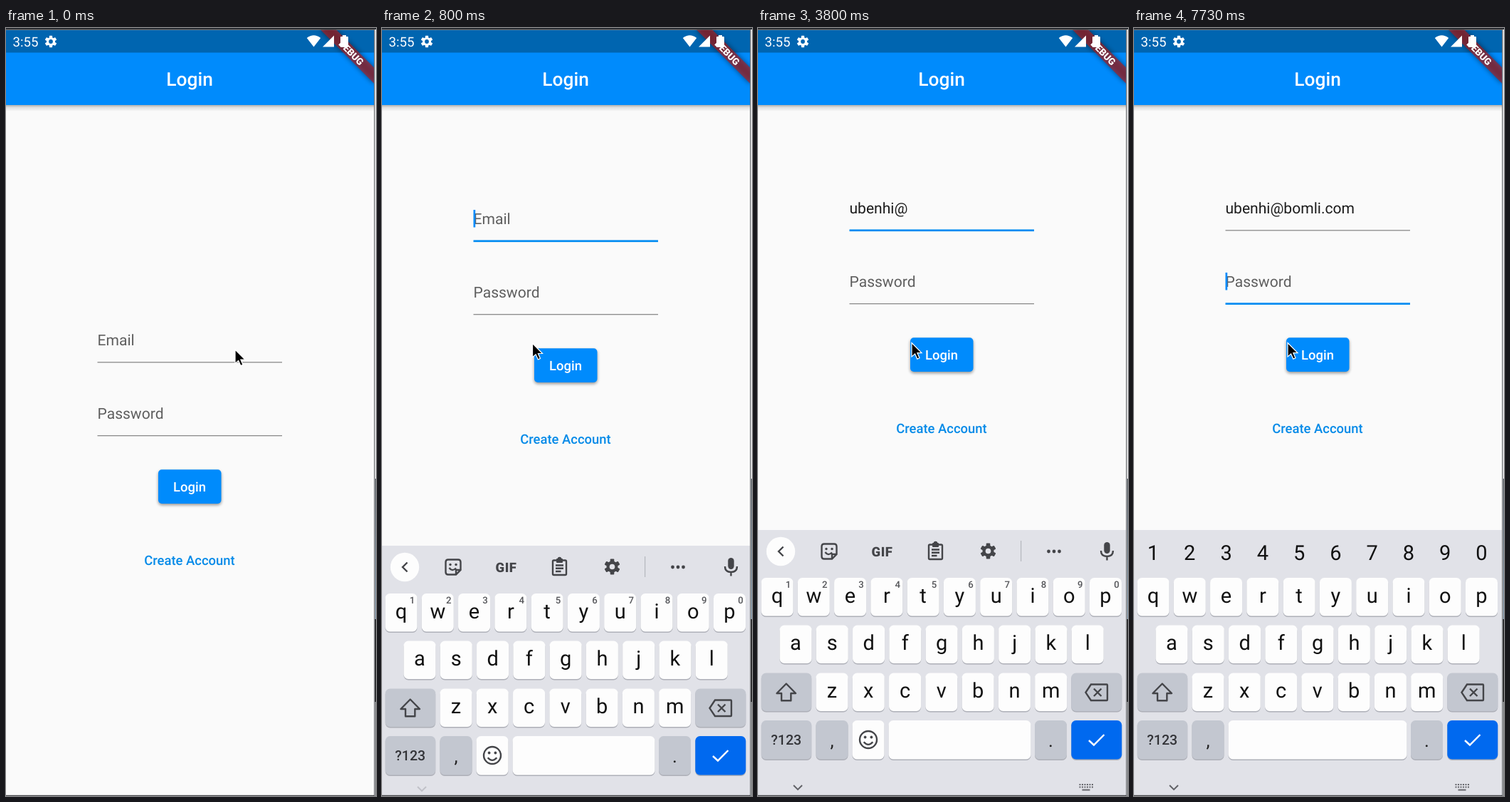
These frames come from a looping animation (520 by 1077 pixels, 8000 ms). An HTML page:

```html
<!DOCTYPE html>
<html lang="en">
<head>
<meta charset="utf-8">
<title>Login form</title>
<style>
html, body { margin: 0; width: 100%; height: 100%; overflow: hidden; background: #fafafa; }
svg { display: block; width: 100%; height: 100%; font-family: Roboto, sans-serif; text-rendering: geometricPrecision; }
.line { fill: none; stroke: #444549; stroke-width: 2.4; }
.mid { text-anchor: middle; }
</style>
</head>
<body>
<svg id="stage" viewBox="0 0 520 1077" xmlns="http://www.w3.org/2000/svg"></svg>
<script>
const LOOP = 8000, STEP = 1000 / 15;
const BLUE = '#008bfc', INK = '#444549', BOARD = '#e1e2e8', KEY = '#fdfdfd', DARK_KEY = '#c3c7d0';
const USER = 'ubenhi', DOMAIN = '@bomli.com', ADDRESS = USER + DOMAIN;
const KEY_TIMES = [2000, 2200, 2330, 2470, 2670, 3000, 3270, 5000, 5270, 5330, 5470, 5670, 5870, 6130, 6270, 6330];
const EMAIL_FOCUS = 600, PASSWORD_FOCUS = 7530, PITCH = 51.28;

const text = (x, y, size, str, fill, extra = '') =>
  `<text x="${x}" y="${y}" font-size="${size}" fill="${fill}" ${extra}>${str}</text>`;
const mid = (x, y, size, str, fill, weight = 400, extra = '') =>
  text(x, y, size, str, fill, `class="mid" font-weight="${weight}" ${extra}`);
const rect = (x, y, w, h, fill, extra = '') =>
  `<rect x="${x}" y="${y}" width="${w}" height="${h}" fill="${fill}" ${extra}/>`;
const line = (d, extra = '') => `<path class="line" d="${d}" ${extra}/>`;
const dot = (x, y, r, fill = INK) => `<circle cx="${x}" cy="${y}" r="${r}" fill="${fill}"/>`;
const key = (x, y, w, fill = KEY, h = 53.5, extra = '') =>
  `<g ${extra}>${rect(x, y + 1.5, w, h, '#aeb0b8', 'rx="6.5"')}${rect(x, y, w, h, fill, 'rx="6.5"')}</g>`;

function gear(x, y, scale, fill, hole) {
  const teeth = [0, 60, 120].map(a =>
    rect(-2.8, -11, 5.6, 22, fill, `rx="1" transform="rotate(${a})"`)).join('');
  return `<g transform="translate(${x} ${y}) scale(${scale})">${teeth}${dot(0, 0, 8, fill)}${dot(0, 0, 3.8, hole)}</g>`;
}

function statusBar() {
  return rect(0, 3, 518, 31.5, '#0065b0') + text(9.5, 25.5, 18.6, '3:55', '#fff') +
    gear(63, 19, .76, '#fff', '#0065b0');
}

function statusIcons() {
  return `<path fill="#fff" d="M432.5 26.5L422.8 14Q432.5 6.5 442.2 14ZM445 26.5L461 10.5V26.5ZM470 13Q470 12 471 12H473V10H478V12H480Q481 12 481 13V26Q481 27 480 27H471Q470 27 470 26Z"/>`;
}

function banner() {
  const box = 'x="-53" y="36.9" width="106" height="15.8"';
  return `<g clip-path="url(#screen)"><g transform="translate(517 3) rotate(45)">
    <rect ${box} fill="#000" opacity=".5" filter="url(#soft)"/>
    <rect ${box} fill="#b71c1c" opacity=".63"/>${mid(0, 49.6, 13.4, 'DEBUG', '#fff', 900)}</g></g>`;
}

function form() {
  const blue = '#058ae8';
  return `<g id="form">
    ${text(128.5, 444.5, 21.07, 'Email', '#5f5f5f', 'id="hint"')}
    ${text(128.5, 444.5, 21.07, '', '#1c1c1c', 'id="typed"')}
    <rect id="composing" x="128.5" y="447" height="1.4" fill="#222"/>
    ${text(128.5, 547.5, 21.07, 'Password', '#5f5f5f')}
    <rect id="emailRule" x="128.5" width="259.5"/><rect id="passRule" x="128.5" width="259.5"/>
    <rect id="caret" width="2.7" height="24.5" fill="${BLUE}"/>
    ${rect(214, 621.5, 88.5, 47.5, '#000', 'rx="5" opacity=".42" filter="url(#lift)"')}
    ${rect(214, 619.3, 88.5, 47.7, BLUE, 'rx="5"')}
    ${mid(258, 649.8, 18.43, 'Login', '#fff', 500)}
    ${mid(258, 752.8, 18.43, 'Create Account', blue, 500)}</g>`;
}

function letterRow(letters, left, top, baseline) {
  return [...letters].map((c, i) => {
    const x = left + i * PITCH;
    return key(x - 22.5, top, 45) + mid(x, baseline, 29, c, '#111');
  }).join('');
}

const digits = draw => [...'1234567890'].map((d, i) => draw(d, 27 + i * PITCH)).join('');

function toolbar() {
  return `<g id="tools">
    ${line('M93 723.5H107Q110.5 723.5 110.5 727V738L104 744.5H93Q89.5 744.5 89.5 741V727Q89.5 723.5 93 723.5ZM110 738H104V744M94.5 735Q98.5 741 104 735.5')}
    ${dot(96, 730.5, 1.7)}${dot(104, 730.5, 1.7)}
    ${mid(174.5, 740.5, 18.5, 'GIF', INK, 800, 'letter-spacing=".6"')}
    ${line('M241.5 724.5H257.5Q259 724.5 259 726V743.5Q259 745 257.5 745H241.5Q240 745 240 743.5V726Q240 724.5 241.5 724.5ZM244 731.5H255M244 735.8H255M244 740H251.5')}
    ${rect(245, 722, 9, 6, INK, 'rx="1"')}${dot(249.5, 722.5, 2.8)}
    ${gear(323.5, 733.5, 1, INK, BOARD)}
    ${rect(369, 719, 1.2, 29, '#b5b7bd')}
    ${[408.5, 416, 423.5].map(x => dot(x, 734, 2.4)).join('')}</g>`;
}

function suggestions() {
  const entry = (x, name) => mid(x, 724, 18.43, name, INK, 500) + mid(x, 746, 15.8, DOMAIN, INK);
  return `<g id="suggest">${mid(115, 742.5, 23.7, '', INK, 400, 'id="word"')}
    ${rect(181.5, 717, 1.2, 32, '#b5b7bd')}${rect(332, 717, 1.2, 32, '#b5b7bd')}
    ${entry(256.5, USER)}${entry(398.5, USER + '26.' + USER.slice(0, 2))}</g>`;
}

function keyboard() {
  return `<g id="board">${rect(0, 704, 517.5, 375, BOARD)}
    <g id="bar">${dot(32, 734, 20.2, KEY)}<g id="arrow">${line('M35.5 727.5L29 734L35.5 740.5')}</g>
      ${rect(486.3, 721, 8.4, 16, INK, 'rx="4.2"')}${line('M482 733Q482 741 490.5 741T499 733M490.5 741V746.5')}</g>
    ${toolbar()}${suggestions()}
    <g id="numbers">${digits((d, x) => mid(x, 745.5, 29, d, '#111'))}</g>
    ${letterRow('qwertyuiop', 27, 771, 805.5)}
    <g id="corner">${digits((d, x) => mid(x + 15.5, 785.3, 13.2, d, '#55565a', 500))}</g>
    ${letterRow('asdfghjkl', 53, 837.5, 872)}
    ${key(4.7, 904.5, 70.5, DARK_KEY)}${line('M39.7 919.5L53 933H46.3V943.3H33V933H26.4Z', 'stroke-linejoin="round"')}
    ${letterRow('zxcvbnm', 104, 904.5, 938.5)}
    ${key(440.3, 904.5, 71, DARK_KEY)}
    ${line('M468 920.5H490Q491 920.5 491 921.5V942Q491 943 490 943H468L460.5 931.8ZM472 926.5L482.5 937M482.5 926.5L472 937')}
    ${key(4.7, 971, 70.5, DARK_KEY, 54.5)}${mid(39.7, 1005, 19.5, '?123', '#333438', 500)}
    ${key(81.5, 971, 45, DARK_KEY, 54.5)}${mid(104, 1008, 26, ',', '#222')}
    ${key(132.5, 971, 251, KEY, 54.5, 'id="wideSpace"')}
    <g id="emoji">${key(132.5, 971, 45, KEY, 54.5)}${key(183.5, 971, 200, KEY, 54.5)}
      <circle class="line" cx="155" cy="998" r="12"/>${dot(150.6, 994.5, 1.9)}${dot(159.4, 994.5, 1.9)}
      ${line('M148.7 1001.2Q155 1008.5 161.3 1001.2')}</g>
    ${key(389, 971, 45, DARK_KEY, 54.5)}${mid(411.5, 1008, 26, '.', '#222')}
    ${key(440.3, 971, 71, '#0069ef', 54.5)}${line('M465 999L472 1005.5L486.5 991', 'style="stroke:#fff"')}</g>`;
}

function navigation() {
  const dots = [0, 1].map(r => [0, 1, 2, 3, 4, 5].map(c =>
    rect(451.5 + c * 3.5, 1060 + r * 3.5, 2, 2, '#66676c')).join('')).join('');
  return `<g id="collapse">${line('M50 1062L56 1068L62 1062', 'style="stroke:#606166;stroke-width:1.9"')}</g>
    <g id="switcher">${dots}${rect(455.5, 1067.5, 11, 2, '#66676c')}</g>`;
}

function frameEdge() {
  return rect(0, 0, 520, 2.6, '#2b2e33') + rect(517.5, 2, 2.5, 1075, '#f3f3f4') +
    rect(518.8, 632, 1.2, 198, 'url(#edge)') + rect(518.5, 829, 1.5, 116, '#0b0b0c') +
    rect(518.8, 945, 1.2, 132, '#77797c') + rect(517.3, 2, 1.1, 1075, '#55585c') +
    rect(0, 1075.8, 518, 1.2, '#45474a');
}

const pointer = `<path id="pointer" d="M0 0V19.5L4.6 15.4L7.8 22.6L11 21.2L7.9 14.2H14Z" fill="#000" stroke="#fff" stroke-width="1.2"/>`;

const stage = document.getElementById('stage');
stage.innerHTML = `<defs>
  <filter id="soft" x="-20%" y="-60%" width="140%" height="220%"><feGaussianBlur stdDeviation="3.6"/></filter>
  <filter id="lift" x="-20%" y="-30%" width="140%" height="160%"><feGaussianBlur stdDeviation="1.9"/></filter>
  <linearGradient id="shade" x2="0" y2="1"><stop stop-opacity=".3"/><stop offset=".4" stop-opacity=".1"/><stop offset="1" stop-opacity="0"/></linearGradient>
  <linearGradient id="edge" x2="0" y2="1"><stop stop-color="#50565c"/><stop offset="1" stop-color="#7c93a8"/></linearGradient>
  <clipPath id="screen"><rect y="2.5" width="517.5" height="1075"/></clipPath></defs>` +
  rect(0, 0, 520, 1077, '#fafafa') + form() +
  rect(0, 108, 518, 9, 'url(#shade)') + rect(0, 34, 518, 74, BLUE) +
  mid(258, 81, 26.33, 'Login', '#fff', 500) + statusBar() + banner() + statusIcons() +
  keyboard() + navigation() + frameEdge() + pointer;

const el = {};
stage.querySelectorAll('[id]').forEach(node => el[node.id] = node);
const set = (id, attrs) => Object.entries(attrs).forEach(([name, value]) => el[id].setAttribute(name, value));
const clamp = v => Math.max(0, Math.min(1, v));
const fade = (id, value) => set(id, { opacity: value });

// Linear interpolation over [time, value] stops
function track(t, stops) {
  const next = stops.findIndex(s => s[0] > t);
  if (next < 0) return stops[stops.length - 1][1];
  if (next === 0) return stops[0][1];
  const [t0, a] = stops[next - 1], [t1, b] = stops[next];
  return a + (b - a) * (t - t0) / (t1 - t0);
}

function rule(id, y, focus) {
  const mix = (a, b) => Math.round(a + (b - a) * focus);
  const h = 1.3 + 1.4 * focus;
  set(id, { y: y - h / 2, height: h, fill: `rgb(${mix(138, 0)},${mix(138, 139)},${mix(138, 242)})` });
}

function render(time) {
  const t = Math.round(Math.floor((time + 4) / STEP) * STEP / 10) * 10;
  const count = KEY_TIMES.filter(k => k <= t).length;
  const inPassword = t >= PASSWORD_FOCUS;
  const ramp = start => t < start ? 0 : clamp((t - start + 67) / 200);

  const lift = track(t, [[670, 0], [730, -115], [800, -170], [870, -182], [930, -185]]);
  const drop = track(t, [[600, 375], [670, 223], [730, 92], [800, 22], [870, 5], [930, 0]]);
  set('form', { transform: `translate(0 ${lift})` });
  set('board', { transform: `translate(0 ${drop})`, visibility: drop > 374 ? 'hidden' : 'visible' });

  el.typed.textContent = ADDRESS.slice(0, count);
  const width = count ? el.typed.getComputedTextLength() : 0;
  fade('hint', 1 - ramp(KEY_TIMES[0]));
  set('composing', { width: count <= USER.length ? width : 0 });
  const passFocus = ramp(PASSWORD_FOCUS);
  rule('emailRule', 468.8, ramp(EMAIL_FOCUS) * (1 - passFocus));
  rule('passRule', 571.7, passFocus);

  const lastInput = inPassword ? PASSWORD_FOCUS : count ? KEY_TIMES[count - 1] : EMAIL_FOCUS;
  const lit = t >= EMAIL_FOCUS && Math.floor((t - lastInput + 45) / 500) % 2 === 0;
  set('caret', { x: 128.5 + (inPassword ? 0 : width), y: inPassword ? 528 : 425, opacity: lit ? 1 : 0 });

  const suggesting = track(t, [[2000, 0], [2200, 1], [3200, 1], [3400, 0]]);
  fade('suggest', suggesting);
  fade('tools', inPassword ? 0 : 1 - suggesting);
  fade('bar', inPassword ? 0 : 1);
  set('arrow', { transform: `rotate(${180 * suggesting} 32 734)` });
  el.word.textContent = ADDRESS.slice(0, Math.min(count, USER.length));
  fade('numbers', inPassword ? 1 : 0);
  fade('wideSpace', inPassword ? 1 : 0);
  fade('emoji', inPassword ? 0 : 1);
  fade('corner', inPassword ? 0 : 1);

  set('collapse', {
    opacity: track(t, [[600, 0], [670, .25], [800, .25], [1000, .7], [2000, .7], [2400, 1]]),
    transform: `translate(0 ${track(t, [[800, 2], [930, 0]])})`
  });
  fade('switcher', track(t, [[800, 0], [1000, .7], [2000, .7], [2400, 1]]));

  const px = track(t, [[0, 322], [70, 312], [130, 290], [330, 258], [530, 258], [600, 250], [670, 235], [730, 219], [800, 211.5], [930, 212], [1070, 216]]);
  const py = track(t, [[0, 451], [330, 449], [600, 448.5], [670, 446.5], [800, 442.3], [1070, 441.5]]);
  set('pointer', { transform: `translate(${px} ${py})` });
}

const start = performance.now();
function tick() {
  render((performance.now() - start) % LOOP);
  requestAnimationFrame(tick);
}
tick();
</script>
</body>
</html>
```
